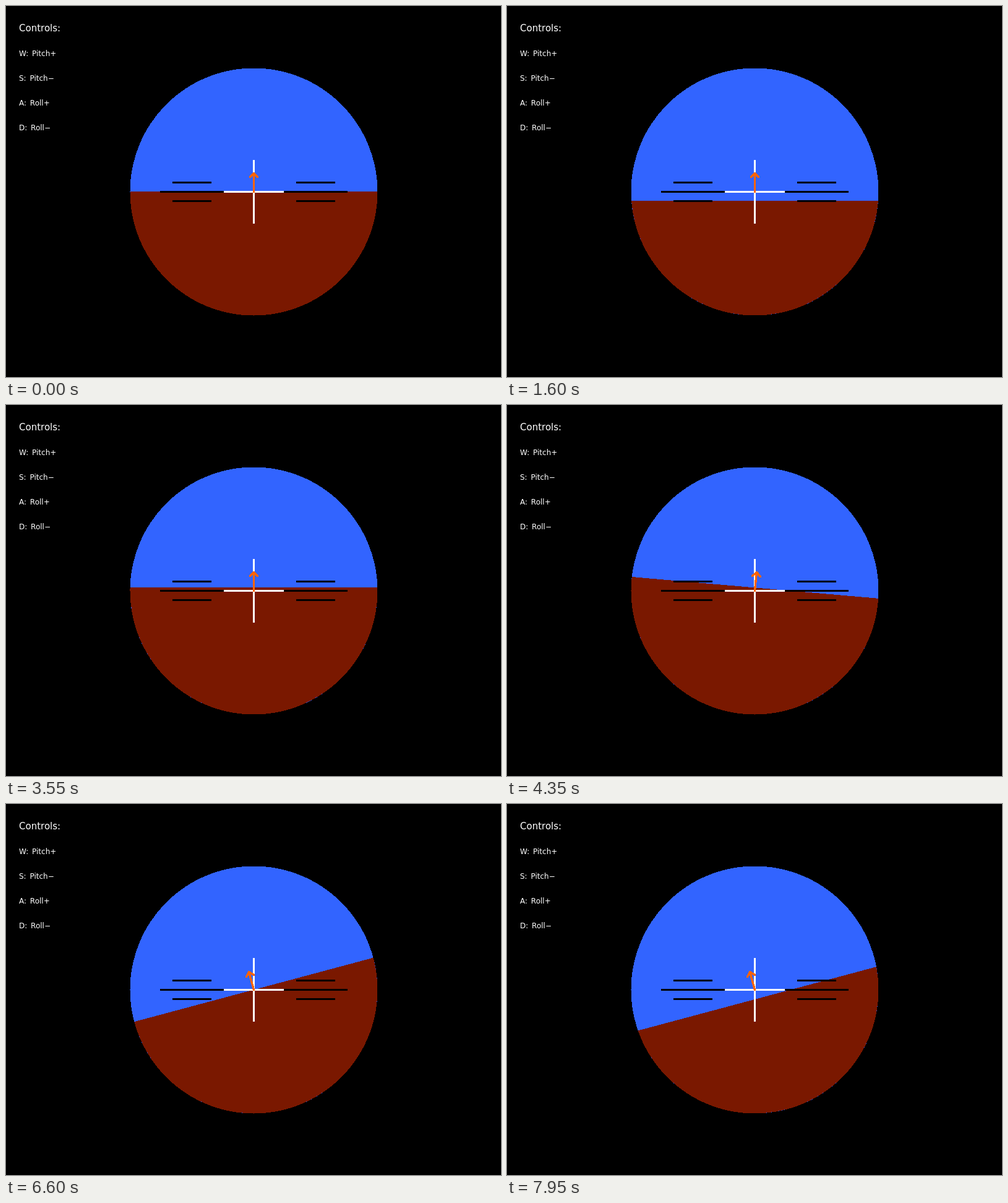
Write an HTML page that moves like this. It is 800 by 600 pixels and loops after 8 s.

```html
<!DOCTYPE html>
<html lang="en">
<head>
<meta charset="utf-8">
<title>Artificial horizon</title>
<style>
html, body { margin: 0; width: 100%; height: 100%; overflow: hidden; background: #000; }
svg { display: block; }
g { shape-rendering: crispEdges; }
text { font: 12px "DejaVu Sans", sans-serif; word-spacing: 2px; fill: #fff; }
.title { font-size: 15px; }
.lines { fill: none; stroke-width: 2.8; stroke-linecap: round; stroke-linejoin: round; }
#arrow { stroke-width: 3.4; }
</style>
</head>
<body>
<svg width="800" height="600" viewBox="0 0 800 600">
  <text class="title" x="21" y="41">Controls:</text>
  <text x="21" y="81">W: Pitch+</text>
  <text x="21" y="121">S: Pitch−</text>
  <text x="21" y="161">A: Roll+</text>
  <text x="21" y="201">D: Roll−</text>
  <g transform="translate(400.5 300.5)">
    <circle r="200" fill="#3264ff"/>
    <path id="ground" fill="#7a1800"/>
    <path class="lines" stroke="#fff" d="M0-50V50M-50 0H50"/>
    <path class="lines" stroke="#000" d="M-150 0H-50M50 0H150M-130-15H-70M70-15H130M-130 15H-70M70 15H130"/>
    <path class="lines" id="arrow" stroke="#ff6400"/>
  </g>
</svg>
<script>
const LOOP = 8000, RADIUS = 200;
const ground = document.getElementById('ground');
const arrow = document.getElementById('arrow');

// Each key press moves the pitch (px) or the roll (degrees) by one step of 5.
const STEP = 5;
const presses = [
  { axis: 'pitch', sign: 1, times: [500, 900, 1300, 6600, 7050, 7450, 7800] },
  { axis: 'pitch', sign: -1, times: [1750, 2250, 2750, 3250] },
  { axis: 'roll', sign: 1, times: [3650, 3950] },
  { axis: 'roll', sign: -1, times: [4300, 4600, 4950, 5250, 5600] }
];

function attitude(time) {
  const state = { pitch: 0, roll: 0 };
  for (const { axis, sign, times } of presses)
    state[axis] += sign * STEP * times.filter(t => t <= time).length;
  return state;
}

function drawArrow(roll) {
  const angle = (roll - 90) * Math.PI / 180;
  const x = Math.round(30 * Math.cos(angle));
  const y = Math.round(30 * Math.sin(angle));
  const wing = side => {
    const a = angle + Math.PI + side * Math.PI / 4;
    return `${Math.round(x + 9 * Math.cos(a))} ${Math.round(y + 9 * Math.sin(a))}`;
  };
  arrow.setAttribute('d', `M0 0L${x} ${y}M${wing(-1)}L${x} ${y}L${wing(1)}`);
}

function draw(time) {
  const { pitch, roll } = attitude(time);
  const y = pitch - 0.1; // a level edge keeps its own pixel row
  const half = Math.sqrt(RADIUS ** 2 - y ** 2);
  ground.setAttribute('d', `M${-half} ${y}A${RADIUS} ${RADIUS} 0 ${y < 0 ? 1 : 0} 0 ${half} ${y}Z`);
  ground.setAttribute('transform', `rotate(${roll})`);
  drawArrow(roll);
}

const start = performance.now();
function frame() {
  draw((performance.now() - start) % LOOP);
  requestAnimationFrame(frame);
}
frame();
</script>
</body>
</html>
```
